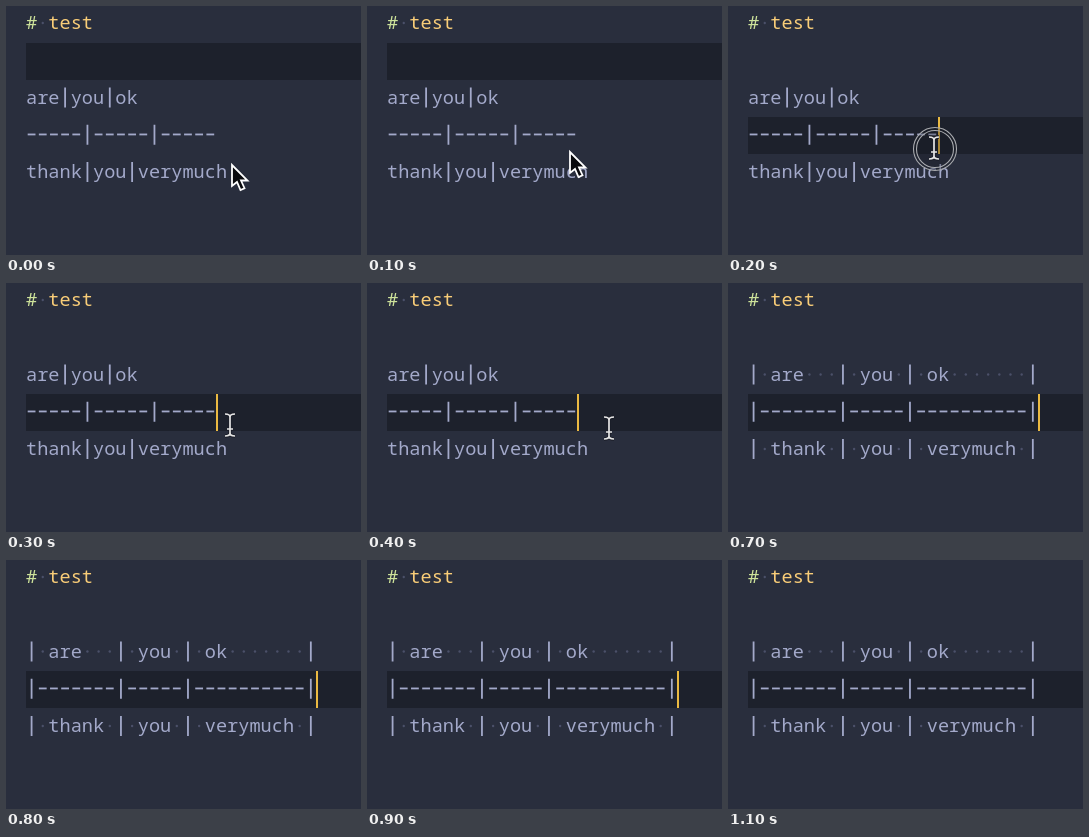
Recreate the animation shown at these times as an HTML page with a canvas. Size 355 px wide and 249 px high, loop 1.2 s.

```html
<!DOCTYPE html>
<html>
<head>
<meta charset="utf-8">
<style>
html, body { margin: 0; width: 100%; height: 100%; overflow: hidden; background: #292e3d; }
canvas { display: block; }
</style>
</head>
<body>
<canvas id="stage" width="355" height="249"></canvas>
<script>
const ctx = document.getElementById('stage').getContext('2d');
const LEFT = 20, CELL = 11.17, LINE = 37.25, STEP = 100, STEPS = 12;
const TEXT = '#a3a9ca', TITLE = '#f9cd78', HASH = '#cde29a', DOT = '#4b5069', CARET = '#eab942';

const raw = ['are|you|ok', '-----|-----|-----', 'thank|you|verymuch'];
const table = ['| are   | you | ok       |', '|-------|-----|----------|', '| thank | you | verymuch |'];
// Pointer position per step; it hides once the table is formatted
const pointer = [[226, 159], [203, 146], [206, 142], [224, 142], [242, 145], [256, 147], [256, 147]];
const caretSteps = [2, 3, 4, 7, 8, 9];

function circle(x, y, r) {
  ctx.beginPath();
  ctx.arc(x, y, r, 0, 7);
}

function drawLine(text, row, color) {
  const base = 23 + row * LINE;
  [...text].forEach((ch, i) => {
    const x = LEFT + (i + 0.5) * CELL;
    ctx.fillStyle = ch === ' ' ? DOT : color(ch);
    if (ch === ' ') {
      circle(x, base - 6, 1.2);
      ctx.fill();
    } else if (ch === '-') {
      ctx.fillRect(x - 3.9, base - 7.2, 7.8, 1.8);
    } else if (ch === '|') {
      ctx.fillRect(x - 0.9, base - 16, 1.8, 20);
    } else {
      ctx.fillText(ch, x, base);
    }
  });
}

function drawArrow(x, y) {
  const points = [[0, 0], [0, 21], [5, 17], [8.5, 25], [12.5, 23.2], [9, 15.5], [15.5, 15.5]];
  ctx.beginPath();
  points.forEach(([dx, dy]) => ctx.lineTo(x + dx, y + dy));
  ctx.closePath();
  ctx.fillStyle = '#08090c';
  ctx.fill();
  ctx.strokeStyle = '#fff';
  ctx.lineWidth = 1.8;
  ctx.stroke();
}

function drawBeam(x, y) {
  ctx.beginPath();
  for (const s of [-1, 1]) {
    ctx.moveTo(x - 5, y + 11 * s);
    ctx.quadraticCurveTo(x, y + 11 * s, x, y + 8 * s);
    ctx.quadraticCurveTo(x, y + 11 * s, x + 5, y + 11 * s);
  }
  ctx.moveTo(x, y - 9);
  ctx.lineTo(x, y + 9);
  ctx.moveTo(x - 3, y + 4);
  ctx.lineTo(x + 3, y + 4);
  for (const [color, width] of [['#1b1e28', 3.4], ['#e6e6e6', 1.7]]) {
    ctx.strokeStyle = color;
    ctx.lineWidth = width;
    ctx.stroke();
  }
}

function drawClick(x, y) {
  circle(x, y, 21.5);
  ctx.fillStyle = 'rgba(20, 23, 32, 0.3)';
  ctx.fill();
  ctx.strokeStyle = '#a9abaf';
  ctx.lineWidth = 1.1;
  ctx.stroke();
  circle(x, y, 18.5);
  ctx.stroke();
}

function draw(step) {
  const activeRow = step < 2 ? 1 : 3;
  const lines = step < 7 ? raw : table;

  ctx.fillStyle = '#292e3d';
  ctx.fillRect(0, 0, 355, 249);
  ctx.fillStyle = '#1d212c';
  ctx.fillRect(LEFT, activeRow * 37, 335, 37);

  ctx.font = '500 18.6px "Noto Sans Mono", "DejaVu Sans Mono", monospace';
  ctx.textAlign = 'center';
  drawLine('# test', 0, ch => ch === '#' ? HASH : TITLE);
  lines.forEach((text, i) => drawLine(text, i + 2, () => TEXT));

  if (caretSteps.includes(step)) {
    ctx.fillStyle = CARET;
    ctx.fillRect(Math.round(LEFT + lines[1].length * CELL), 111, 2, 37);
  }

  if (step === 2) drawClick(207, 143);
  const spot = pointer[step];
  if (spot) (step < 2 ? drawArrow : drawBeam)(...spot);
}

const start = performance.now();
function tick() {
  draw(Math.floor((performance.now() - start) / STEP) % STEPS);
  requestAnimationFrame(tick);
}
tick();
</script>
</body>
</html>
```
